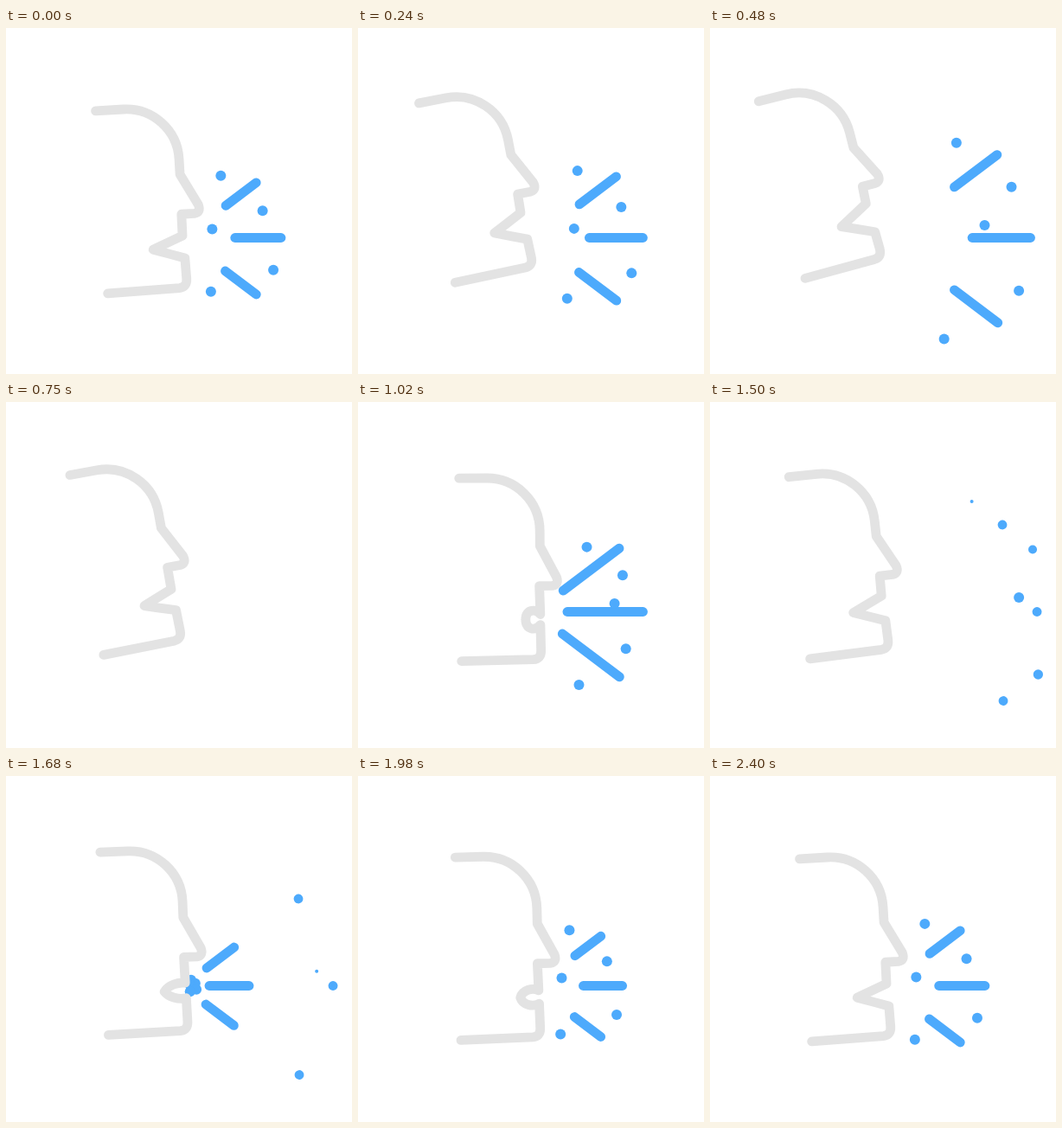
An HTML page with a canvas for the animation above (2.43 s loop, 400 by 400 pixels).

```html
<!DOCTYPE html>
<html lang="en">
<head>
<meta charset="utf-8">
<title>Cough</title>
<style>
  html, body { margin: 0; width: 100%; height: 100%; overflow: hidden; background: #fff; }
  canvas { display: block; width: 100vmin; height: 100vmin; }
</style>
</head>
<body>
<canvas id="stage" width="400" height="400"></canvas>
<script>
const LOOP = 2430, STEP = 30;
const GREY = '#e3e3e3', BLUE = '#4daafc';
const ctx = document.getElementById('stage').getContext('2d');

const mix = (a, b, p) => a + (b - a) * p;
const mixPoint = (a, b, p) => [mix(a[0], b[0], p), mix(a[1], b[1], p)];
const clamp = v => Math.max(0, Math.min(1, v));
const part = (t, from, span) => clamp((t - from) / span);
const smooth = p => p * p * (3 - 2 * p);
const settle = (t, from, tau) => 1 - Math.exp(-Math.max(0, t - from) / tau);

// Smooth, overshoot-free interpolation through rows of [time, ...values].
function track(keys, t) {
  let i = 0;
  while (t >= keys[i + 1][0]) i++;
  const slope = (k, c) => (keys[k + 1][c] - keys[k][c]) / (keys[k + 1][0] - keys[k][0]);
  const tangent = (k, c) => {
    if (k === 0) return slope(0, c);
    if (k === keys.length - 1) return 0;
    const a = slope(k - 1, c), b = slope(k, c);
    return a * b > 0 ? 2 * a * b / (a + b) : 0;
  };
  const [a, b] = [keys[i], keys[i + 1]];
  const h = b[0] - a[0], p = (t - a[0]) / h;
  return a.slice(1).map((v, j) => mix(v, b[j + 1], smooth(p))
    + h * p * (1 - p) * ((1 - p) * tangent(i, j + 1) - p * tangent(i + 1, j + 1)));
}

// Key poses: time, lean in degrees, sag, how far the mouth is open.
const rest = [-3.4, 9.5, .63];
const poses = [
  [0, ...rest],
  [240, -11, 2.5, .87],
  [540, -14.5, 0, 1],
  [750, -10.2, 0, .57],
  [1020, -.4, 0, 0],
  [1320, -8.9, 2, 1.05],
  [1680, -2.2, 1, .25],
  [1790, -.8, 4, 0],
  [2400, ...rest],
  [LOOP, ...rest]
];

// The head is rigid and rocks about the end of the jaw; only the lips change.
function drawHead(t) {
  const [lean, sag, open] = track(poses, t);
  const purse = 1 - clamp(open / .6);
  const bulge = 9.6 * purse ** 1.5, round = 6 * purse;
  const lip = mix(93, 91, clamp(open)), top = 158 - 13 * open, low = 170 + 9.5 * open;
  const corner = 57 + 19 * purse, mid = 164;

  ctx.save();
  ctx.translate(120 + .7 * lean, 300 + .75 * lean + sag);
  ctx.rotate(lean * Math.PI / 180);
  ctx.translate(-1.5, -211.5);
  ctx.strokeStyle = GREY;
  ctx.beginPath();
  ctx.moveTo(0, 0);
  ctx.arc(32, 61, 61, -Math.PI / 2, 0);
  ctx.lineTo(93, 79);
  ctx.lineTo(112, 115);
  ctx.quadraticCurveTo(115, 124, 107, 125);
  ctx.lineTo(92, 125);
  ctx.lineTo(lip, top);
  ctx.bezierCurveTo(
    mix(lip, corner, 1 / 3), mix(top, mid, 1 / 3) - bulge,
    mix(lip, corner, 2 / 3) - round, mix(top, mid, 2 / 3) - bulge,
    corner, mid);
  ctx.bezierCurveTo(
    mix(corner, 93, 1 / 3) - round, mix(mid, low, 1 / 3) + bulge,
    mix(corner, 93, 2 / 3), mix(mid, low, 2 / 3) + bulge,
    93, low);
  ctx.lineTo(93.5, 200);
  ctx.quadraticCurveTo(93.5, 209.5, 84.5, 210);
  ctx.lineTo(1.5, 211.5);
  ctx.stroke();
  ctx.restore();
}

// Rays run from a to b; reach is where the tip hovers in the slow burst.
const rays = [
  { a: [232, 222], b: [338, 142], reach: .54 },
  { a: [235, 242.5], b: [378, 242.5], reach: .58 },
  { a: [231, 264], b: [339, 345.5], reach: .54 }
];

// Drops leave the mouth, hover in the slow burst, and fly a little past far.
const mouth = [210, 243];
const drops = [
  { hover: [248.5, 170.5], far: [297.5, 122], gone: 1560 },
  { hover: [297, 211], far: [364, 174.5], gone: 1650 },
  { hover: [238.5, 232.5], far: [349, 227], gone: 1740 },
  { hover: [309.5, 280], far: [370, 311], gone: 1670 },
  { hover: [237, 305], far: [283, 378], gone: 1440 }
];
for (const d of drops) d.end = mixPoint(mouth, d.far, 1.08);

// Shoots out and fades in one go.
const quick = {
  from: 870, to: 1740,
  trim: (ray, t) => [smooth(part(t, 960, 450)), Math.cbrt(part(t, 870, 520))],
  place: (d, t) => mixPoint(mouth, d.end, settle(t, 885, 157)),
  size: (d, t) => part(t, 870, 30) * (1 - part(t, d.gone - 180, 180))
};

// Shoots out, hovers across the end of the loop, then flies off.
const slow = {
  from: 1640, to: LOOP + 690,
  trim({ reach }, t) {
    const tail = .21 * settle(t, 1680, 160), tip = reach * part(t, 1640, 760) ** .2;
    return [
      mix(tail, 1, part(t, LOOP, 630) ** 4),
      mix(tip, 1, part(t, LOOP, 510) ** 2.2)
    ];
  },
  place(d, t) {
    const hovering = mixPoint(mouth, d.hover, settle(t, 1665, 140));
    return mixPoint(hovering, d.end, part(t, LOOP, 560) ** 2.8);
  },
  size: (d, t) => part(t, 1640, 40) * (1 - part(t, LOOP + 580, 110))
};

function drawBurst(burst, t) {
  if (t < burst.from) t += LOOP;
  if (t >= burst.to) return;
  ctx.strokeStyle = ctx.fillStyle = BLUE;
  for (const ray of rays) {
    const [tail, tip] = burst.trim(ray, t);
    ctx.beginPath();
    ctx.moveTo(...mixPoint(ray.a, ray.b, tail));
    ctx.lineTo(...mixPoint(ray.a, ray.b, Math.max(tip, tail + .0005)));
    ctx.stroke();
  }
  for (const d of drops) {
    ctx.beginPath();
    ctx.arc(...burst.place(d, t), 6 * burst.size(d, t), 0, Math.PI * 2);
    ctx.fill();
  }
}

ctx.lineWidth = 10.8;
ctx.lineCap = ctx.lineJoin = 'round';
const start = performance.now();

function frame(now) {
  const t = Math.floor(Math.max(0, now - start) % LOOP / STEP) * STEP;
  ctx.fillStyle = '#fff';
  ctx.fillRect(0, 0, 400, 400);
  drawBurst(quick, t);
  drawBurst(slow, t);
  drawHead(t);
  requestAnimationFrame(frame);
}
frame(start);
</script>
</body>
</html>
```
